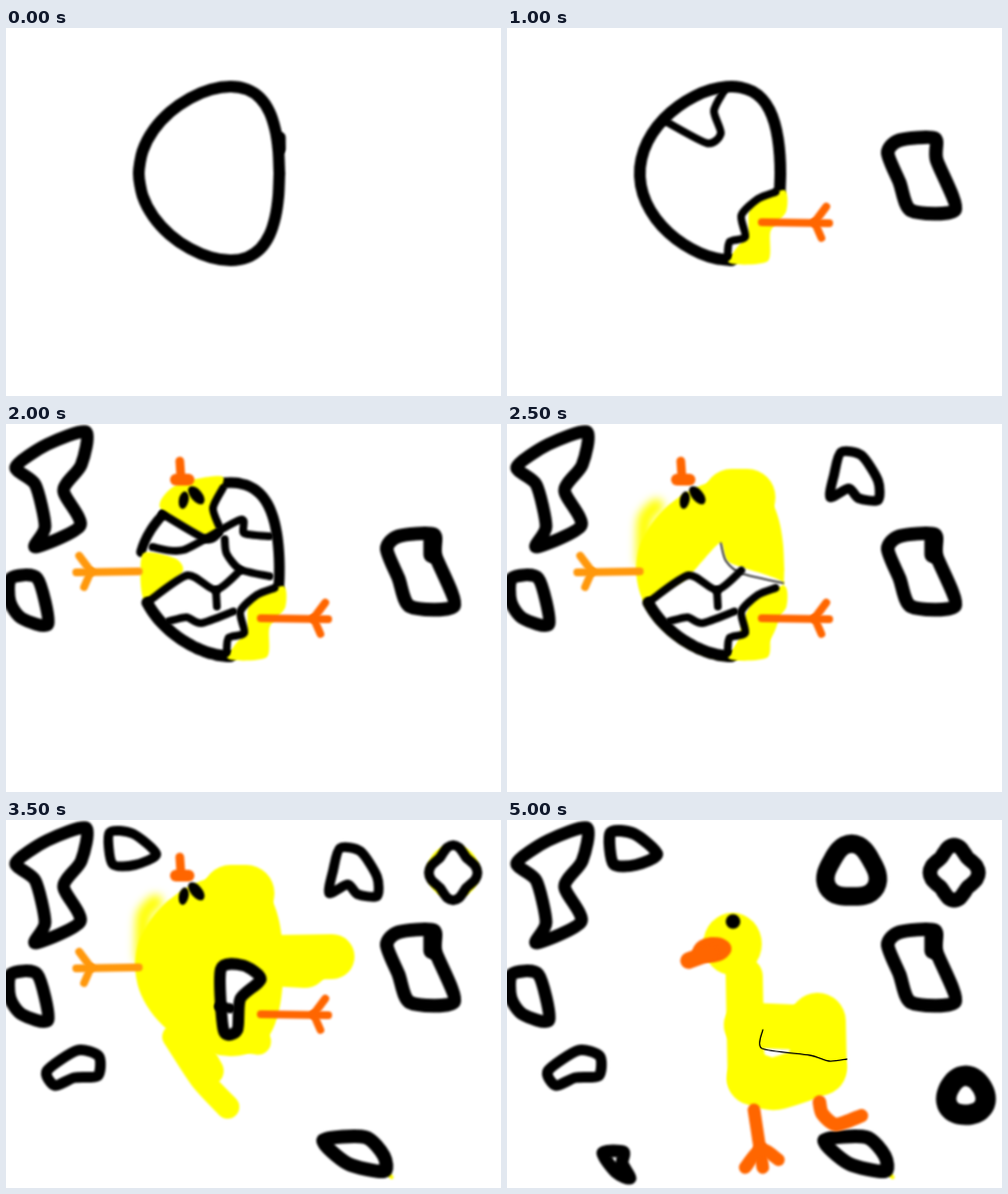
Write an HTML page with a canvas that moves like this. It is 507x377 px and loops after 5500 ms.

```html
<!DOCTYPE html>
<html>
<head>
<meta charset="utf-8">
<style>
html, body { margin: 0; width: 100%; height: 100%; overflow: hidden; background: #fff; }
canvas { display: block; width: 507px; height: 377px; }
</style>
</head>
<body>
<canvas id="stage" width="507" height="377"></canvas>
<script>
const ctx = document.getElementById('stage').getContext('2d');
const BLACK = '#000', WHITE = '#fff', YELLOW = '#ffff00', ORANGE = '#ff6600', AMBER = '#ff980c';
const { PI, sin, cos } = Math;
const STEP = 500, STEPS = 11;

// Smooth curve through a flat list of x, y pairs
function trace(p, closed) {
  const n = p.length / 2;
  const at = i => {
    i = closed ? (i + n) % n : Math.max(0, Math.min(n - 1, i));
    return [p[2 * i], p[2 * i + 1]];
  };
  ctx.beginPath();
  ctx.moveTo(p[0], p[1]);
  for (let i = 0; i < (closed ? n : n - 1); i++) {
    const [a, b, c, d] = [at(i - 1), at(i), at(i + 1), at(i + 2)];
    ctx.bezierCurveTo(
      b[0] + (c[0] - a[0]) / 8, b[1] + (c[1] - a[1]) / 8,
      c[0] - (d[0] - b[0]) / 8, c[1] - (d[1] - b[1]) / 8, c[0], c[1]);
  }
  if (closed) ctx.closePath();
}

function fill(color) {
  ctx.fillStyle = color;
  ctx.fill();
}

function stroke(width, color = BLACK) {
  ctx.lineWidth = width;
  ctx.strokeStyle = color;
  ctx.stroke();
}

function line(p, width, color) {
  trace(p, false);
  stroke(width, color);
}

function blob(p, color) {
  trace(p, true);
  fill(color);
}

function ring(p, width) {
  blob(p, WHITE);
  stroke(width);
}

function oval(x, y, rx, ry, turn = 0, color = BLACK) {
  ctx.beginPath();
  ctx.ellipse(x, y, rx, ry, turn, 0, PI * 2);
  fill(color);
}

// Closed outline whose radius swells in a number of lobes
function lobed(x, y, rx, ry, lobes, depth, turn, width) {
  const p = [];
  for (let i = 0; i < 24; i++) {
    const t = i * PI / 12, r = 1 + depth * cos(lobes * (t - turn));
    p.push(x + rx * r * cos(t), y + ry * r * sin(t));
  }
  ring(p, width);
}

// Part of the egg outline; angle 0 is right, angles grow clockwise
function eggArc(from, to) {
  const p = [];
  for (let i = 0; i <= 24; i++) {
    const t = from + (to - from) * i / 24;
    p.push(208 + 72 * cos(t) + 22 * sin(t) ** 2, 149 + 89 * sin(t));
  }
  return p;
}

// Leg along x with three toes opening towards dir
function leg(x, fork, y, dir, color) {
  line([x, y, fork + dir * 15, y + 1], 8, color);
  line([fork + dir * 12, y - 16, fork, y], 8, color);
  line([fork, y, fork + dir * 7, y + 16], 8, color);
}

function lowerGap() {
  blob([284,166, 286,188, 270,208, 267,239, 227,240, 246,210, 250,182], YELLOW);
  line([275,168, 257,175, 240,192, 244,214, 228,219, 226,234], 8);
}

function beakAndEyes() {
  line([178,38, 179,52], 9, ORANGE);
  line([174,57, 187,57], 12, ORANGE);
  oval(182, 78, 5, 9, 0.2);
  oval(195, 73, 6, 11, -0.7);
}

function headGap() {
  blob([158,86, 175,62, 222,54, 212,86, 217,110, 205,115], YELLOW);
  line([222,66, 212,86, 218,104], 8);
  line([160,92, 205,118, 218,112], 8);
}

function sideGap() {
  blob([140,133, 174,138, 180,153, 142,181], YELLOW);
}

function upperCracks() {
  line([150,126, 182,129, 240,98, 244,112, 270,115], 8);
  line([224,118, 226,133, 240,149, 270,156], 8);
}

function lowerCracks() {
  line([147,181, 186,155, 215,170, 240,150], 8);
  line([215,170, 216,187], 8);
  line([167,202, 185,198, 200,204, 233,192], 8);
}

function yellowBody() {
  ctx.filter = 'blur(5px)';
  line([153,84, 141,98, 140,140], 15, YELLOW);
  ctx.filter = 'blur(0.9px)';
  trace(eggArc(0, PI * 2), true);
  fill(YELLOW);
  stroke(8, YELLOW);
  line([230,75, 246,75], 58, YELLOW);
}

function halfBody(wing) {
  yellowBody();
  if (wing) line([275,139, 333,127], 39, YELLOW);
  blob([148,182, 185,157, 218,122, 228,142, 283,163, 246,192, 228,236, 165,213], WHITE);
  line([219,122, 224,140, 240,153, 283,163], 1.5);
}

function fullBody() {
  yellowBody();
  line([270,141, 334,140], 46, YELLOW);
  line([270,146, 306,148], 48, YELLOW);
  line([245,225, 258,227], 27, YELLOW);
  line([190,225, 208,257], 30, YELLOW);
  line([172,222, 200,265, 227,294], 24, YELLOW);
}

function bellyGap() {
  ring([220,153, 243,149, 261,163, 240,183, 237,215, 223,216], 12);
  line([218,191, 230,193], 10);
}

function duckling() {
  oval(231, 127, 30, 32, 0, YELLOW);
  line([243,160, 245,265], 38, YELLOW);
  line([252,265, 275,270, 321,255], 54, YELLOW);
  line([245,210, 315,213], 46, YELLOW);
  line([318,206, 319,250], 58, YELLOW);
  oval(210, 133, 20, 13, -0.1, ORANGE);
  line([186,144, 208,136], 17, ORANGE);
  oval(231.5, 104, 7.5, 7.5);
  line([253,297, 258,330, 262,356], 13, ORANGE);
  line([244,356, 260,337, 278,348], 13, ORANGE);
  line([320,289, 323,301, 337,312, 363,303], 14, ORANGE);
  ctx.filter = 'none';
  line([262,215, 261,234, 310,241, 330,247, 348,245], 1.3);
}

function rightShard(late) {
  ring([390,128, 402,115, 438,113, 440,135, 459,186, 414,187, 402,158], 14);
  if (late) line([436,118, 436,134], 17);
}

function leftShards() {
  ring([82,8, 77,42, 59,68, 76,104, 30,126, 40,105, 30,62, 10,44, 42,21], 13);
  ring([5,158, 32,158, 43,205, 16,199, 4,182], 13);
}

// Grows heavier with each stage, ending as a rounded ring
function archShard(stage) {
  if (stage === 2) return lobed(353, 54, 26, 27, 3, 0.1, PI / 6, 19);
  ring([342,29, 363,32, 380,58, 380,78, 360,76, 350,66, 331,75, 335,52], 10 + 3 * stage);
}

function lowShards() {
  ring([42,257, 73,236, 95,242, 94,262, 70,264, 50,272], 11);
  line([390,361, 395,366], 4, YELLOW);
  ring([325,328, 368,325, 387,344, 387,360, 350,352], 14);
}

function shards(k) {
  rightShard(k > 2);
  if (k > 2) leftShards();
  if (k > 4) archShard(Math.max(0, k - 8));
  if (k > 5) ring([106,13, 130,14, 154,35, 132,46, 109,45], k < 10 ? 10 : 12);
  if (k === 6) ring([384,240, 436,243, 439,278, 392,264], 9);
  if (k > 6) {
    if (k < 9) oval(458, 53, 27, 28, 0, YELLOW);
    lobed(458, 54, 22, 25, 4, 0.13, 0, k < 9 ? 10 : 15);
    lowShards();
  }
  if (k > 7) lobed(470, 283, 20, 20, 3, 0.05, 0.5, 21);
  if (k > 8) ring([98,341, 119,340, 118,352, 126,367, 112,361], 13);
}

function chick(k) {
  if (k < 3) {
    line(eggArc(PI / 2, PI * 2 + 0.2), 12);
    if (k === 2) line([222,65, 212,85, 219,108, 205,118, 163,96], 8);
  } else if (k < 5) {
    line(eggArc(PI + 0.2, PI + 0.7), 10);
    line(eggArc(PI * 1.5 - 0.08, PI * 2 + 0.2), 11);
    sideGap();
    headGap();
    if (k === 4) upperCracks();
  } else if (k < 7) {
    halfBody(k === 6);
  } else {
    fullBody();
    if (k === 7) bellyGap();
  }
  if (k > 2 && k < 7) line(eggArc(PI / 2, 2.75), 12);
  if (k > 3 && k < 7) lowerCracks();
  if (k < 7) lowerGap();
  if (k > 2) beakAndEyes();
  if (k > 1) leg(261, 315, 199, 1, ORANGE);
  if (k > 3) leg(136, 87, 151, -1, AMBER);
}

function draw(k) {
  ctx.filter = 'none';
  ctx.fillStyle = WHITE;
  ctx.fillRect(0, 0, 507, 377);
  ctx.filter = 'blur(0.9px)';
  ctx.lineCap = ctx.lineJoin = 'round';
  if (k === 0) {
    ring(eggArc(0, PI * 2), 12);
    line([281,112, 281,124], 11);
    return;
  }
  shards(k);
  if (k < STEPS - 1) chick(k);
  else duckling();
}

let shown = -1;
const start = performance.now();
function tick() {
  const k = Math.floor((performance.now() - start) / STEP) % STEPS;
  if (k !== shown) draw(shown = k);
  requestAnimationFrame(tick);
}
tick();
</script>
</body>
</html>
```
